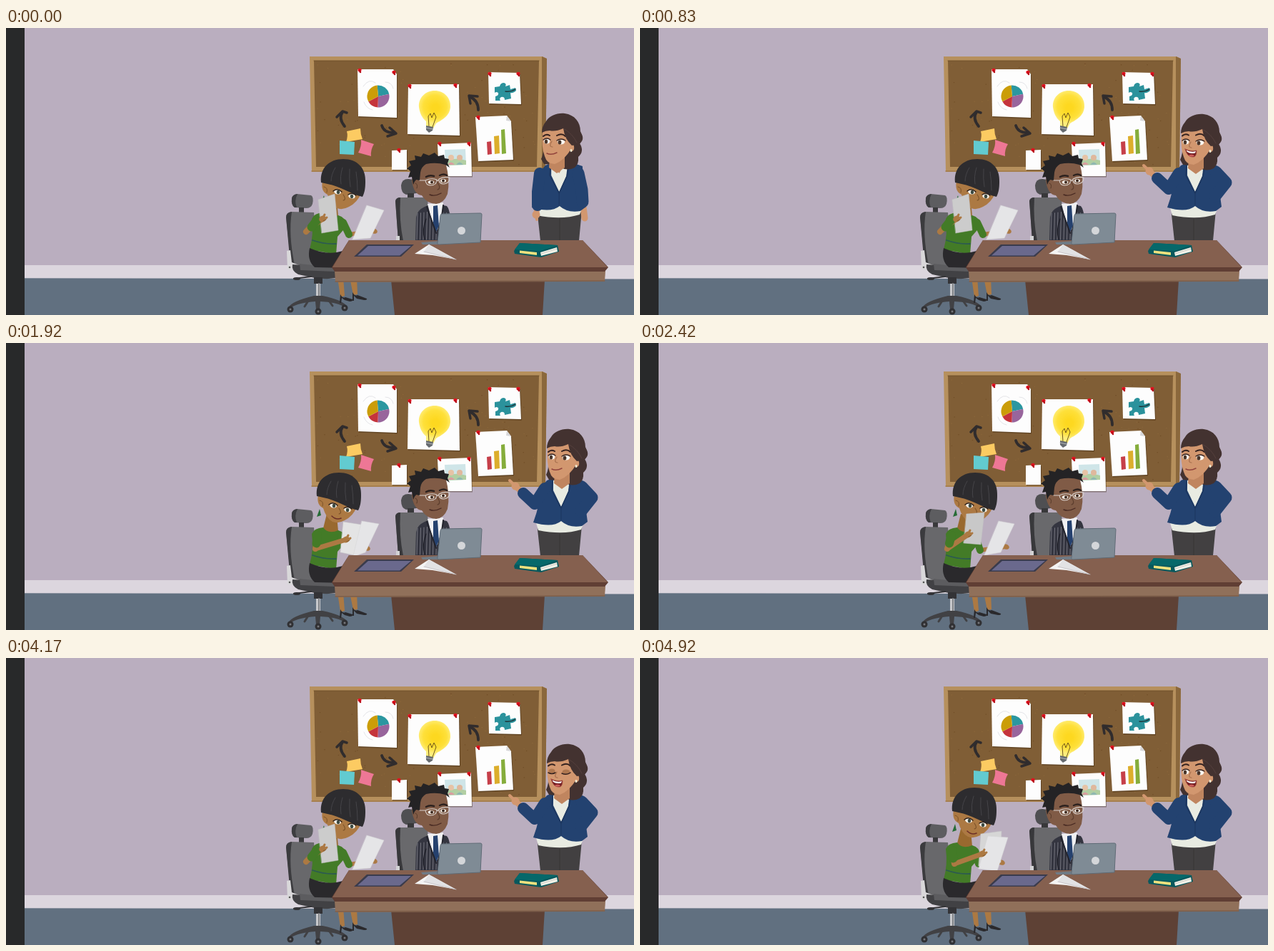
An HTML page with a canvas for the animation above (5.01 s loop, 879x403 px).

```html
<!DOCTYPE html>
<html lang="en">
<head>
<meta charset="utf-8">
<title>Office meeting</title>
<style>
html, body { margin: 0; width: 100%; height: 100%; overflow: hidden; background: #baaebf; }
canvas { display: block; width: 879px; height: 403px; }
</style>
</head>
<body>
<canvas id="stage" width="879" height="403"></canvas>
<script>
const LOOP = 5010, STEPS = 60;
const stage = document.getElementById('stage').getContext('2d');
let g = stage;

function shape(d, fill, stroke, width = 1) {
  const path = new Path2D(d);
  if (fill) { g.fillStyle = fill; g.fill(path); }
  if (stroke) {
    g.strokeStyle = stroke;
    g.lineWidth = width;
    g.lineCap = g.lineJoin = 'round';
    g.stroke(path);
  }
}
const line = (d, color, width) => shape(d, null, color, width);
const quad = (pts, fill, stroke, width) => shape('M' + pts.join(' ') + 'Z', fill, stroke, width);
const limb = (pts, color, width) => line('M' + pts.join(' '), color, width);
function oval(x, y, rx, ry, fill, turn = 0) {
  g.beginPath();
  g.ellipse(x, y, rx, ry, turn, 0, 7);
  g.fillStyle = fill;
  g.fill();
}
function shifted(x, y, draw) {
  g.save();
  g.translate(x, y);
  draw();
  g.restore();
}
function layer(draw) {
  const c = document.createElement('canvas');
  c.width = 879;
  c.height = 403;
  g = c.getContext('2d');
  draw();
  g = stage;
  return c;
}
const mix = (a, b, k) => a.map((v, i) => v + (b[i] - v) * k);
const ease = k => { k = Math.max(0, Math.min(1, k)); return k * k * (3 - 2 * k); };

let seed = 11;
const random = () => (seed = seed * 16807 % 2147483647) / 2147483647;

// ---- room and cork board ----
function pin(x, y) {
  oval(x, y, 2.6, 2.3, '#e3111f');
  line(`M${x} ${y + 1}l1 2`, '#b80d18', 2.5);
}
function sheet(pts) {
  shifted(1, 1.5, () => quad(pts, 'rgba(50,30,10,.4)'));
  quad(pts, '#fdfdfd');
}
function pie(x, y, r) {
  [[-95, -12, '#2b97a0'], [-12, 92, '#98659c'], [92, 152, '#c5343c'], [152, 265, '#cb9d08']].forEach(([a, b, c]) => {
    g.beginPath();
    g.moveTo(x, y);
    g.arc(x, y, r, a * Math.PI / 180, b * Math.PI / 180);
    g.fillStyle = c;
    g.fill();
  });
}
function bulb() {
  const glow = g.createRadialGradient(601, 112, 5, 600, 110, 24);
  glow.addColorStop(0, '#fdd820');
  glow.addColorStop(.6, '#fee03a');
  glow.addColorStop(1, '#ffee7c');
  shape('M578 111C577 98 587 88 600 88C613 88 623 98 622 111C621 124 610 129 602 134L598 141L588 138L588 131C582 126 579 119 578 111Z', glow);
  line('M592 138L591 124L594 120L596 126L599 119L602 125L597 139', '#6e571b', 1);
  shape('M588 137L598 139L597 144L592 147L588 143Z', '#666b70');
  line('M588 140l9 2', '#b7babc', 1);
}
function puzzle() {
  shape('M684 83L691 82Q692 77 697 77Q701 78 699 82L705 80L706 86L713 84L714 88Q709 92 706 91L707 99L698 101Q698 96 693 97Q690 99 692 102L685 102L685 96Q690 95 689 91Q686 89 684 91Z', '#2b929c');
  line('M699 89Q707 90 713 86', '#1f3338', 1.4);
}
function arrows() {
  const ink = '#302c2d';
  line('M474 138Q465 127 471 118', ink, 3.8);
  line('M463 125L471 117L477 119', ink, 3.5);
  line('M526 137Q529 147 542 147', ink, 3.8);
  line('M537 140L546 148L534 152', ink, 3.5);
  line('M661 115Q661 102 650 97', ink, 3.8);
  line('M650 106L648 95L660 96', ink, 3.5);
}
function board() {
  shape('M425 40L751 40L757 43L755 198L750 202L428 202Z', '#b6905d');
  shape('M750 40L757 43L755 199L750 202Z', '#8b683c');
  shape('M431 46L746 46L743 195L434 195Z', '#805e36');
  line('M431 46L746 46', '#6d4e28', 1);
  line('M428 201L750 201', '#a37c48', 1.5);
  for (let i = 0; i < 110; i++)
    oval(436 + random() * 304, 49 + random() * 143, .8, .6, i % 2 ? '#6f4d27' : '#8c683b');

  sheet([492, 58, 542, 58, 547, 65, 547, 126, 493, 124]);
  line('M500 82Q508 70 517 77M531 76Q540 76 542 85M501 104Q504 113 513 115', '#e4e4e8', 1);
  pie(521, 96, 15.5);
  sheet([563, 79, 634, 79, 635, 151, 562, 149]);
  bulb();
  sheet([675, 62, 719, 63, 721, 107, 676, 106]);
  puzzle();
  sheet([657, 125, 701, 123, 707, 131, 710, 185, 661, 187]);
  shape('M701 123L700 130L707 131Z', '#d7d7d9');
  shape('M673 160l6 -1l1 18l-6 1Z', '#c63f49');
  shape('M683 152l7 -1l1 25l-7 1Z', '#dcae2c');
  shape('M693 143l5 -1l2 34l-6 1Z', '#85ad3b');
  sheet([540, 172, 561, 171, 561, 199, 540, 199]);
  sheet([604, 163, 651, 161, 652, 208, 606, 208]);
  shape('M614 171L643 170L644 192L615 193Z', '#cfe5e8');
  shape('M614 187Q629 181 644 186L644 192L615 193Z', '#b2cfa3');
  oval(623, 182, 4, 4, '#e6c3a5');
  oval(635, 182, 4, 4, '#dfb89d');
  shape('M618 192q5 -7 10 0Z', '#d99d9f');
  shape('M630 192q5 -7 10 0Z', '#8fb8b0');
  shape('M477 145L496 141Q496 149 499 156L476 160Q479 152 477 145Z', '#fccb62');
  shape('M467 158L488 160L487 178L467 177Z', '#62cbd0');
  shape('M497 157L515 163Q510 171 511 180L493 175Q498 166 497 157Z', '#ee7795');
  arrows();
  [[495, 59], [543, 62], [565, 81], [629, 80], [677, 64], [717, 64], [661, 125], [550, 171], [607, 162], [648, 162]].forEach(p => pin(...p));
}
function room() {
  shape('M0 0H879V403H0Z', '#baaebf');
  shape('M0 333H879V354H0Z', '#dcd6de');
  shape('M0 351.3L879 352.5V403H0Z', '#617080');
  shape('M0 0H26V403H0Z', '#28292a');
  board();
}

// ---- chairs, seated man, desk ----
function man() {
  const skin = '#805b46', hair = '#242325';
  shape('M553 221Q554 212 563 212L579 214L582 231L560 234Q553 232 553 221Z', '#4f4f52');
  shape('M562 232H571V241H562Z', '#38383a');
  shape('M545 243Q546 238 552 238L590 238L594 299H549Z', '#69696c');
  shape('M545 243Q546 238 552 238Q550 270 556 299H549Z', '#38383b');
  shape('M546 292h5v6h-5Z', '#d2d2d4');

  shape('M573 298L574 266Q575 256 586 251L598 246L617 250Q624 258 623 298Z', '#343540');
  for (let x = 576; x < 624; x += 4.5) line(`M${x} ${257 - Math.abs(x - 599) * -.15}L${x - 1} 297`, '#878790', .8);
  line('M588 268Q582 284 586 297', '#1c1d25', 1.2);
  shape('M590 247L612 245L610 262L604 284L596 270Z', '#f0f0f2');
  shape('M598 250L604 249L606 278L602 286L598 274Z', '#25416e');
  line('M589 251L602 288M612 249Q610 268 605 284', '#22232c', 2);

  shape('M568 215Q570 197 583 188L615 188Q622 214 618 233Q613 246 602 247Q588 246 582 235Q571 234 568 215Z', skin);
  shape('M570 220L568 209L563 210L566 201L561 197L567 193L564 187L573 185L572 179L581 181L584 176L592 179L600 175L605 180L613 178L614 183L620 184L618 190L621 196L615 192Q602 188 588 191Q581 195 580 203L579 214L574 213Z', hair);
  oval(575, 221, 4.5, 7, skin);
  line('M573 218Q577 219 575 225', '#573a2a', 1);
  line('M588 209Q593 206 599 208M607 207Q613 204 617 207', '#2c211e', 2.5);
  oval(595, 216.5, 4.3, 2.5, '#f1ece5');
  oval(612, 214.5, 4, 2.5, '#f1ece5');
  oval(596, 216.5, 1.9, 2.1, '#39251b');
  oval(612, 214.5, 1.9, 2.1, '#39251b');
  line('M579 214L587 214Q588 221 594 221Q603 221 603 213Q595 210 587 214M603 215L606 213Q606 219 613 219Q621 218 621 210Q613 208 606 212', '#d8d0cb', 1.1);
  line('M603 216Q610 225 604 227', '#5c3e2e', 1.2);
  line('M593 234Q600 237 609 232', '#482a23', 1.4);
}
function desk() {
  shape('M539 354H754L751 403H544Z', '#5e4135');
  shape('M460 341H839L838 356L461 357Z', '#90705a');
  line('M461 356L838 355', '#755642', 1);
  shape('M480 298H807L843 336L838 342H460L456 336Z', '#603e34');
  shape('M480 298H807L842 336H457Z', '#85604f');

  shape('M505 304L571 304L553 321L487 321Z', '#3a3b4c');
  shape('M507 306L567 306L551 319.5L492 319.5Z', '#6a698d');
  shape('M572 317L592 304L630 325L597 319Z', '#f4f4f4');
  shape('M592 304L630 325L585 314Z', '#e2e2e4');
  line('M585 314L630 325', '#bfbcc0', .8);

  shape('M581 301L608 299L606 304L583 304Z', '#707b86');
  shape('M608 263Q608 261 611 261L664 260Q666 260 666 262L664 301L606 304Q603 304 604 301Z', '#7f8b95', '#5f6b76', 1);
  oval(637.5, 284.5, 5.5, 5.5, '#d4d6d9');

  shape('M711 313L719 302L772 305L774 314L749 322L712 317Z', '#07585d');
  shape('M719 302L772 305L748 313L712 311Z', '#06686a');
  shape('M719 312.5L743 315V319L719 316Z', '#eee17e');
  shape('M748 315L771 308L772 314L749 320Z', '#f2f1e8');
  line('M749 317L771 310', '#bcbab2', .7);
}
function chair() {
  shape('M400 239Q401 234 407 233L427 235Q431 237 429 247Q427 253 420 253L404 252Q399 249 400 239Z', '#5d5d60');
  shape('M400 239Q401 234 408 233Q403 243 407 252L404 252Q399 249 400 239Z', '#3d3d40');
  shape('M410 252h7v10h-7Z', '#39393b');
  shape('M392 266Q392 259 399 258L431 259L438 335L399 333Z', '#68686b');
  shape('M392 266Q392 259 400 258Q395 290 404 333L398 332Z', '#3b3b3e');
  shape('M393 313L398 312L400 329L410 333L410 341L394 339Z', '#d9d8da');
  oval(397, 336, 1.3, 1.3, '#555');
  oval(405, 337, 1.3, 1.3, '#555');
  shape('M401 332L472 337L475 349Q455 354 432 351L409 346Q399 341 401 332Z', '#414144');
  shape('M411 331L466 337L460 342L412 340Z', '#5c5c5f');
  line('M403 352L427 349', '#333336', 2);
  oval(407, 352, 5, 2, '#333336');
  shape('M431 350h12v9h-12Z', '#333336');
  shape('M434 359h6v17h-6Z', '#c7c8cb');
  line('M438 359v17', '#808387', 2);
  shape('M396 392Q399 384 431 376H443Q472 382 477 391L473 391Q462 385 440 384L439 395H434L433 384Q409 386 400 392Z', '#414144');
  line('M425 380L418 391M450 380L457 390', '#414144', 3);
  [[398, 395], [437, 398], [474, 393]].forEach(([x, y]) => {
    oval(x, y, 4.5, 4.5, '#303033');
    oval(x, y, 1.5, 1.5, '#77777b');
  });
}
const BROWN = '#ac7943', GREEN = '#437b27', BLACK = '#2a292c';

function legs() {
  shape('M464 350L472 350L474 376L468 378Z', BROWN);
  shape('M481 350L491 350L492 374L486 375Z', BROWN);
  shape('M468 374Q471 380 475 378L485 381Q486 384 481 384L474 382L470 379L469 386L467 386Z', BLACK);
  shape('M485 371Q488 377 492 375L505 380Q506 382 501 382L491 380L487 376L487 383L485 383Z', BLACK);
}
function dress() {
  shape('M449 240L463 243L465 264L455 271L444 260Z', '#99692f');
  shape('M428 268Q431 260 444 259Q451 269 465 263Q476 266 477 278L464 293L462 318L425 311Q431 290 428 268Z', GREEN);
  line('M429 298Q446 304 462 303', '#2c5a51', 1.8);
  shape('M425 309Q445 318 463 315L480 311L476 337L432 336Q421 326 425 309Z', BLACK);
}

const backdrop = layer(room);
const seating = layer(() => { man(); chair(); legs(); dress(); });
const furniture = layer(desk);

// ---- seated woman: head, arm, hand, two sheets, shade of the first sheet ----
const apart = { head: [6, 2], left: [437, 241, 460, 233, 465, 284, 442, 288], right: [505, 249, 529, 256, 510, 295, 485, 297],
  arm: [435, 270, 420, 286, 443, 268], far: [472, 273, 480, 290, 515, 285], shade: [204] };
const parting = { head: [3, 0], left: [457, 240, 482, 238, 477, 283, 453, 281], right: [502, 250, 524, 254, 505, 294, 482, 298],
  arm: [436, 270, 430, 289, 459, 269], far: [470, 273, 476, 291, 512, 286], shade: [200] };
const joined = { head: [0, 0], left: [472, 251, 498, 255, 492, 299, 468, 294], right: [498, 250, 522, 254, 503, 294, 486, 300],
  arm: [436, 270, 433, 289, 476, 276], far: [468, 273, 474, 289, 505, 288], shade: [228] };
const closing = { head: [2, 0], left: [477, 247, 506, 243, 505, 287, 474, 292], right: [487, 250, 515, 252, 500, 299, 474, 296],
  arm: [437, 270, 440, 289, 479, 275], far: [468, 273, 474, 289, 506, 287], shade: [214] };
const track = [[0, apart], [1300, apart], [1590, closing], [1840, joined], [2180, joined], [2420, parting],
  [2670, apart], [4420, apart], [4920, closing], [LOOP, closing]];

function poseAt(t) {
  const i = track.findIndex((key, n) => n && t <= key[0]);
  const [t0, a] = track[i - 1], [t1, b] = track[i];
  const k = ease((t - t0) / (t1 - t0)), pose = {};
  for (const part in a) pose[part] = mix(a[part], b[part], k);
  return pose;
}
function seatedHead(smile) {
  shape('M437 213Q434 227 444 232Q448 246 457 251Q465 254 474 249Q486 243 491 230L478 214Z', BROWN);
  line('M439 221Q445 222 443 229', '#7d5329', 1);
  shape('M439 233L441 242L435 244Z', '#276c37');
  oval(458, 228, 5, 3.5, '#f3f0e9', .25);
  oval(478, 234, 4.8, 3.3, '#f3f0e9', .25);
  oval(459, 228.5, 2.2, 2.8, '#3d4b43');
  oval(478, 234.5, 2.2, 2.8, '#3d4b43');
  line('M452 227Q458 222 464 228M473 232Q479 228 484 233', '#2b1d16', 1.4);
  line('M466 232Q471 239 466 240', '#7d5329', 1.1);
  if (smile) line('M456 243Q462 249 469 246', '#6c2f28', 1.6);
  shape('M435 215C433 195 446 182 466 182C486 182 498 195 497 214C497 223 496 229 493 235C478 232 462 220 444 217Q440 216 435 215Z', '#2d2c2f');
  line('M455 194Q449 204 449 213M465 194Q461 207 463 217M475 196Q474 210 476 221M484 200Q486 213 486 226', '#454448', 1);
}
function seatedWoman(t) {
  const { head, left, right, arm, far, shade } = poseAt(t);
  shifted(head[0], head[1], () => seatedHead(head[0] < 2.8));
  limb(far.slice(2), BROWN, 6);
  limb(far.slice(0, 4), GREEN, 10);
  oval(far[4], far[5], 5, 3.5, BROWN, .4);
  const grey = Math.round(shade[0]);
  quad(left, `rgb(${grey},${grey},${grey})`, '#c0c0c2', .5);
  quad(right, '#e5e5e7', '#d4d4d6', .5);
  const [x0, y0, ex, ey, hx, hy] = arm;
  limb([ex, ey, hx, hy], BROWN, 7);
  limb(arm.slice(0, 4), BROWN, 8);
  limb([x0, y0, x0 + (ex - x0) * .5, y0 + (ey - y0) * .6], GREEN, 12);
  oval(hx, hy, 5, 4.3, BROWN, -.6);
  line(`M${hx} ${hy}l3 -6M${hx + 2} ${hy + 1}l4 -3`, BROWN, 3);
  line(`M${hx + 1} ${hy + 3}l4 -2`, '#7d5329', .8);
}

// ---- standing woman ----
const MOUTHS = 'ccccccmomoomcomomcomcmccccccccccccccccccccccmomcomomoocmomoo';
const SKIN = '#d2976f', NAVY = '#234270', HAIR = '#433230';

function mouth(kind) {
  if (kind === 'c') {
    line('M764 177Q770 180 778 176', '#92443d', 1.5);
    return;
  }
  const drop = kind === 'o' ? 182 : 178;
  shape(`M763 170Q771 174 779 172Q779 ${drop} 773 ${drop - 1}Q766 ${drop - 1} 763 170Z`, '#741f22', '#a4463f', .8);
  shape('M764.5 171.5Q772 175 778 173L777 175.5Q770 177 766 174Z', '#fff');
  if (kind === 'o') oval(772, 179, 3.5, 1.5, '#cb5c5a');
}
function standingHead(kind, blink) {
  shape('M759 164Q760 177 756 185L760 192L771 193L776 180Z', HAIR);
  shape('M786 135L811 147Q818 157 810 163Q817 174 808 182Q809 192 803 197Q793 202 784 197L780 182Z', HAIR);
  shape('M768 180L789 176L789 197L778 205L767 197Z', '#c0855f');
  shape('M758 146Q756 168 761 181Q764 192 775 192Q789 187 799 169L797 145L784 130L764 134Z', SKIN);
  oval(799, 169, 3.2, 4.8, SKIN);
  oval(798, 173, 1.5, 2, '#f4efd6');
  const lift = kind === 'o' ? -1.5 : 0;
  line(`M759 ${153 + lift}Q763 ${149 + lift} 768 ${152 + lift}M778 ${152 + lift}Q785 ${148 + lift} 790 ${153 + lift}`, '#33211f', 2);
  if (blink) {
    oval(764, 159, 4.5, 3.5, '#ae774f');
    oval(784, 160, 5.5, 3.5, '#ae774f');
    line('M759 161Q764 164 769 161M778 162Q785 165 790 161', '#33211f', 1.5);
  } else {
    oval(764, 160, 4.2, 3.4, '#fbf8f2');
    oval(784, 161, 5.2, 3.4, '#fbf8f2');
    oval(763, 160.5, 2.2, 3, '#49352a');
    oval(782, 161.5, 2.4, 3, '#49352a');
    line('M759 158Q764 154 769 158M778 159Q784 155 790 159', '#33211f', 1.3);
  }
  line('M771 160Q766 168 772 168', '#a26b4a', 1.1);
  mouth(kind);
  shape('M757 148Q757 139 763 132C768 124 778 120 789 121C803 123 811 133 811 146Q816 156 810 164L799 166Q789 157 787 142Q776 147 768 145Q762 145 757 148Z', HAIR);
  line('M787 142Q800 149 806 162', '#5a4340', .8);
}
function standingWoman(t, step) {
  const k = ease((t - 160) / 500), shift = k * 7 - 7;
  const point = mix([747, 204, 744, 230, 744, 249], [754, 204, 740, 226, 724, 211], k);
  const hip = mix([801, 204, 806, 227, 807, 244], [806, 202, 820, 217, 805, 236], k);
  const hand = mix([742, 262, 743, 269], [713, 201, 705, 193], k);
  shape('M745 256H806L802 299H748L744 262Z', '#424041');
  line('M775 268V298', '#363435', 1);
  limb([hip[4], hip[5], hip[4] + 3 * (1 - k), hip[5] + 23 * (1 - k)], SKIN, 9);
  shifted(shift * .3, 0, () => {
    shape('M741 249L810 249L805 262Q780 270 745 263Z', '#e8ebe2');
    shape('M757 193L770 188L794 189L809 194Q810 224 814 251L806 257Q788 260 777 250Q765 260 738 252Q748 225 748 204Z', NAVY);
  });
  limb(hip, NAVY, 17);
  limb([point[4], point[5], hand[0], hand[1]], SKIN, 8);
  oval(hand[0], hand[1], 5.5, 5.5, SKIN);
  limb(hand, SKIN, 4);
  limb(point, NAVY, 16);
  shifted(shift * .4, 0, () => {
    shape('M766 193L789 190L787 208L777 230L766 207Z', '#e8ebe2');
    shape('M768 190L787 188L777 204Z', '#c0855f');
    line('M765 193L764 207L777 232L788 208L791 192', '#1c365f', 1.6);
    line('M777 232V249', '#1c365f', 1);
  });
  const blink = step >= 49 && step <= 51 || step === 36;
  shifted(shift, k - 1, () => standingHead(MOUTHS[step], blink));
}

function draw(now) {
  const step = Math.min(STEPS - 1, Math.floor((now % LOOP + 8) * STEPS / LOOP));
  const t = step * LOOP / STEPS;
  stage.drawImage(backdrop, 0, 0);
  standingWoman(t, step);
  stage.drawImage(seating, 0, 0);
  seatedWoman(t);
  stage.drawImage(furniture, 0, 0);
}
let start;
function tick(now) {
  start ??= now;
  draw(now - start);
  requestAnimationFrame(tick);
}
draw(0);
requestAnimationFrame(tick);
</script>
</body>
</html>
```
